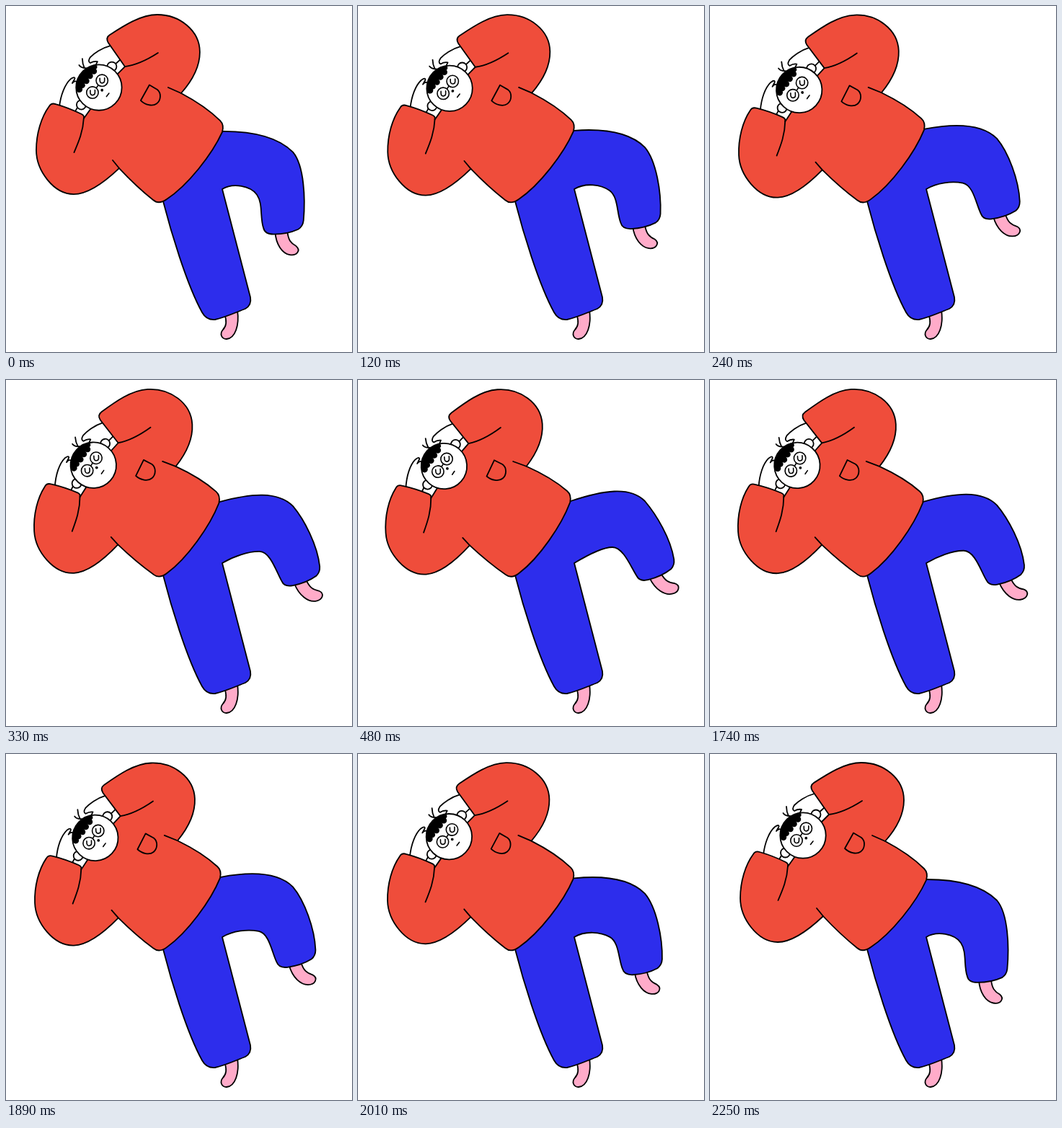
Write an HTML page that moves like this. It is 480 px wide and 480 px high and loops after 3.48 s.

```html
<!DOCTYPE html>
<html lang="en">
<head>
<meta charset="utf-8">
<title>Swaying figure</title>
<style>
  html, body { margin: 0; width: 100%; height: 100%; overflow: hidden; background: #fff; }
  svg { display: block; width: 100vw; height: 100vh; }
  .ink { stroke: #000; stroke-width: 1.8; stroke-linecap: round; stroke-linejoin: round; fill: none; }
  .red { fill: #ef4d3b; }
  .blue { fill: #2d2dec; }
  .pink { fill: #ffabc9; }
  .white { fill: #fff; }
</style>
</head>
<body>
<svg viewBox="0 0 480 480">
  <g class="ink">
    <path class="pink" d="M303 427C307 438 305 445 301 449C296 455 299 462 306 462C318 461 324 443 321 422"/>
    <path id="foot" class="pink" d="M-12 2C-11 20 -2 32 8 34C18 36 24 28 17 22C10 18 6 14 5 1"/>
    <path id="trousers" class="blue"/>
  </g>

  <g id="body" class="ink">
    <!-- hands -->
    <path class="white" d="M74 140C76 123 82 108 90 101Q96 97 95.500 101L92 107Q96 102 100 106L104 132L95 148"/>
    <path class="white" d="M145 55C133 58 122 66 117 71Q113 77 117 79Q122 76 127 77L124 83L148 84L159 74"/>

    <!-- sweater -->
    <path class="red" d="M165 84L142 51Q138 44 144 40C164 27 187 12 210 12
      C241 12 269 34 269 64C269 84 259 103 243 121C260 130 282 144 297 159Q303 165 300 175
      C286 206 252 249 223 268Q212 276 204 269C189 257 172 241 157 225
      C138 243 115 261 94 261C66 261 42 228 42 200C42 177 49 154 60 139Q63 134 69 136
      C83 140 95 145 105 150Q109 152 108 156L118 142L155 94Z"/>
    <path d="M165 84C181 82 197 74 211 65M243 121L225 113M157 225L148 214
      M108 155C107 174 101 188 94.500 203"/>
    <path d="M199 109.500L210 116C216 121 215 131 209 135.500C203 140 193 137 187 131Z"/>

    <!-- head -->
    <circle class="white" cx="104.500" cy="137" r="6.500"/>
    <circle class="white" cx="147" cy="84" r="6.500"/>
    <circle class="white" cx="129" cy="113" r="31.700"/>
    <path fill="#000" stroke="none" d="M97.500 117A32 32 0 0 1 125 81.500a3.500 3.500 0 0 1 0 6
      a4 4 0 0 1 -6 6a4 4 0 0 1 -5 7a4 4 0 0 1 -5 7a4 4 0 0 1 -3 6.500a4 4 0 0 1 -8.500 3Z"/>
    <path d="M109 86Q106 80 106 73M111 86Q104 86 101.500 82"/>
    <g stroke-width="1.600">
      <g id="eye">
        <circle cx="120" cy="120" r="8.200"/>
        <path d="M117 117v3c0 5 6.500 4.500 6.500 0v-3.500"/>
      </g>
      <use href="#eye" x="13.300" y="-16.700"/>
      <path d="M125.500 113.500L128 110M139.500 125.500L143 121"/>
    </g>
    <circle cx="133.300" cy="116.700" r="1.900" fill="#000" stroke="none"/>
  </g>
</svg>
<script>
const LOOP = 3480, STEP = 30;
const byId = id => document.getElementById(id);
const [foot, trousers, body] = ['foot', 'trousers', 'body'].map(byId);

// The fixed leg, ending at the crotch where the raised leg begins.
const STANDING = 'M218 271C228 310 250 385 272 425Q278 436 290 435' +
  'C304 432 319 425 332 420Q341 415 339 404L300 254';

const polar = (length, degrees) => {
  const angle = degrees * Math.PI / 180;
  return [length * Math.cos(angle), length * Math.sin(angle)];
};

// Centre of the raised cuff, which swings outwards along an arc.
const cuffCentre = p => [385 + 30 * p * (1.4 - 0.4 * p), 311.5 - 43 * p];

function legPath(p) {
  const [cx, cy] = cuffCentre(p);
  const [cos, sin] = polar(1, -11.5 - 14 * p);
  const cuff = (x, y) => [cx + x * cos - y * sin, cy + x * sin + y * cos];

  const bendX = 348 + 5 * p, bendY = 262 - 30 * p;
  const [dx, dy] = polar(15, 56 * (1 - p) ** 2);
  const kneeX = 398, kneeY = 203 - 35 * p;

  return STANDING
    + `C315 245 ${bendX - dx} ${bendY - dy} ${bendX} ${bendY}`
    + `C${[bendX + dx, bendY + dy, cuff(-29, -24), cuff(-27, -9)]}`
    + `Q${[cuff(-27, 0), cuff(-15, 2.5)]}`
    + `C${[cuff(-3, 5), cuff(10, 5), cuff(20, 2.7)]}`
    + `Q${[cuff(27, 0), cuff(29.5, -7.6)]}`
    + `C${[cuff(38, -36), kneeX + 16, kneeY + 19, kneeX, kneeY]}`
    + `C${[kneeX - 21, kneeY - 21, 340, 174 - 21 * p, 301 - 6 * p, 174 - 6 * p]}`;
}

function sway(t, start, end) {
  const x = Math.min(1, Math.max(0, (t - start) / (end - start)));
  return (1 - Math.cos(Math.PI * x)) / 2;
}

function draw(now) {
  const t = Math.floor(now % LOOP / STEP) * STEP;
  const p = sway(t, -30, 480) - sway(t, 1560, 2250);
  body.setAttribute('transform', `translate(${p} ${p / 2}) rotate(${-3.9 * p} 212 272)`);
  foot.setAttribute('transform', `translate(${cuffCentre(p)}) rotate(${-23 * p})`);
  trousers.setAttribute('d', legPath(p));
}

let begin;
function tick(now) {
  begin ??= now;
  draw(now - begin);
  requestAnimationFrame(tick);
}
draw(0);
requestAnimationFrame(tick);
</script>
</body>
</html>
```
